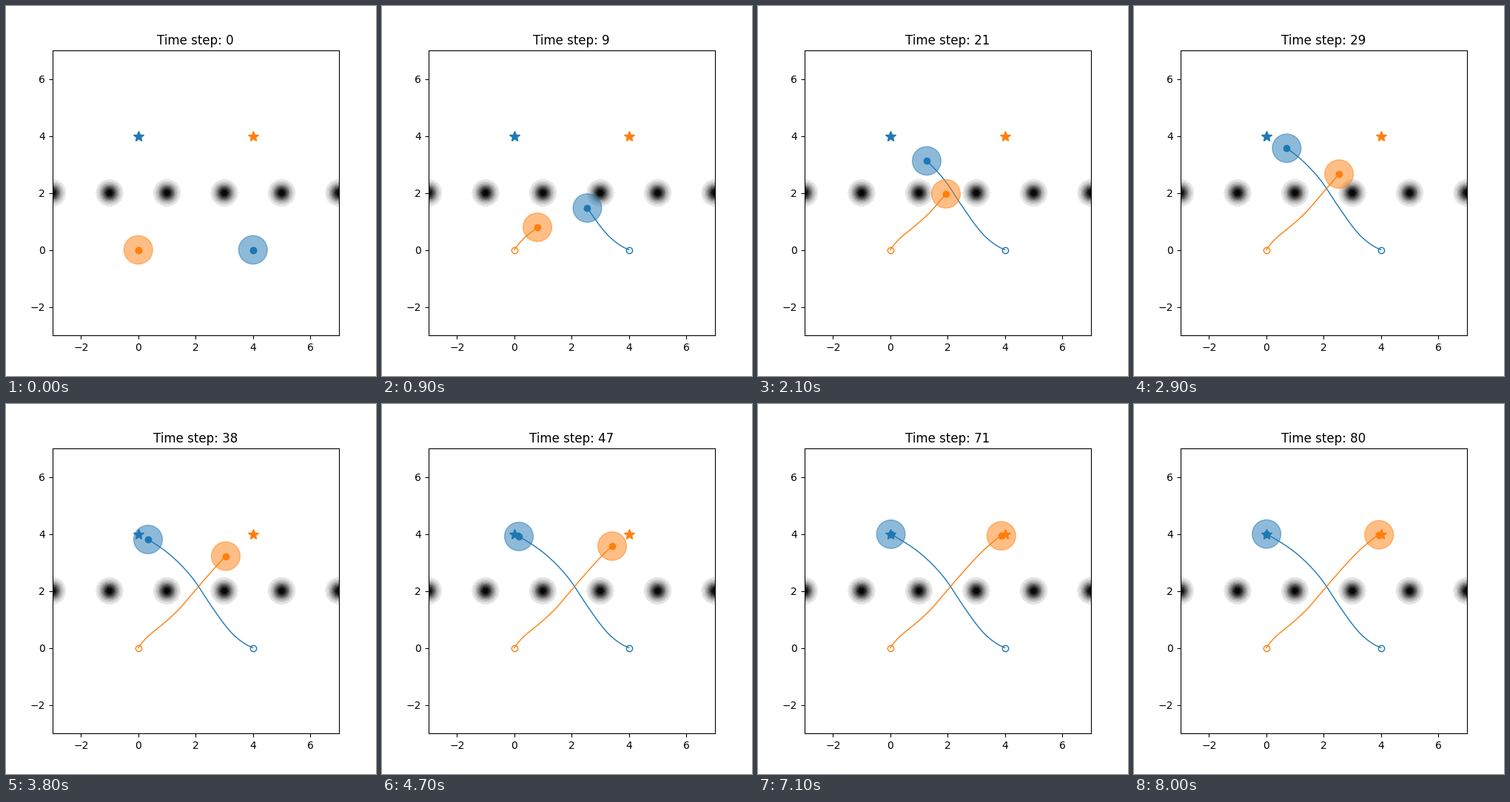
A matplotlib script for the animation above (8100 ms loop, 500 by 500 pixels).

```python
import numpy as np
import matplotlib.pyplot as plt
from matplotlib.animation import FuncAnimation
from matplotlib.patches import Circle

STEPS = 81
INTERVAL = 100
KEY_STEPS = np.array([0, 4, 9, 15, 21, 47, 80])

# Waypoints (x, y) at the key steps.
BLUE_PATH = [(4, 0), (3.284, .494), (2.548, 1.468), (1.845, 2.507),
             (1.27, 3.122), (.161, 3.909), (.01, 3.994)]
ORANGE_PATH = [(0, 0), (.32, .387), (.806, .792), (1.41, 1.345),
               (1.942, 1.966), (3.413, 3.571), (3.934, 3.969)]


def hermite(t, keys, values):
    """Smooth curve through the values, with slopes taken from their neighbours."""
    slopes = np.gradient(values, keys, axis=0, edge_order=2)
    i = np.clip(np.searchsorted(keys, t, side="right") - 1, 0, len(keys) - 2)
    h = (keys[i + 1] - keys[i])[:, None]
    u = (t - keys[i])[:, None] / h
    ease = u * u * (3 - 2 * u)
    return ((1 - ease) * values[i] + ease * values[i + 1]
            + h * u * (1 - u) * ((1 - u) * slopes[i] - u * slopes[i + 1]))


def approach(path, goal):
    """Positions at every step; the distance to the goal decays exponentially."""
    path, goal = np.array(path, float), np.array(goal, float)
    side = np.sign(goal - path[0] + (goal == path[0]))
    log_left = np.log((goal - path) * side)
    return goal - side * np.exp(hermite(np.arange(STEPS), KEY_STEPS, log_left))


def draw_obstacles(ax):
    x, y = np.meshgrid(np.linspace(-3, 7, 401), np.linspace(1, 3, 81))
    field = sum(np.exp(-((x - cx) ** 2 + (y - 2) ** 2) / (2 * 0.2**2))
                for cx in range(-3, 8, 2))
    ax.contourf(x, y, np.minimum(field, 1), levels=np.arange(1, 16) / 15,
                cmap="gray_r", vmin=0, vmax=1)


class Agent:
    def __init__(self, ax, color, path, goal):
        self.track = approach(path, goal)
        start = self.track[0]
        ax.plot(*goal, "*", color=color, ms=10)
        ax.plot(*start, "o", color=color, mfc="none", ms=6)
        self.trail, = ax.plot([], [], color=color, lw=1)
        self.body = ax.add_patch(Circle(start, 0.5, color=color,
                                        alpha=0.5, zorder=2.5))
        self.dot, = ax.plot([], [], "o", color=color, ms=6, zorder=3)

    def move(self, step):
        self.trail.set_data(*self.track[:step + 1].T)
        self.body.center = self.track[step]
        self.dot.set_data(*self.track[step:step + 1].T)


fig, ax = plt.subplots(figsize=(5, 5), dpi=100)
draw_obstacles(ax)
ax.set(xlim=(-3, 7), ylim=(-3, 7))
title = ax.set_title("")
agents = [Agent(ax, "C0", BLUE_PATH, (0, 4)),
          Agent(ax, "C1", ORANGE_PATH, (4, 4))]


def update(step):
    title.set_text(f"Time step: {step}")
    for agent in agents:
        agent.move(step)


anim = FuncAnimation(fig, update, frames=STEPS, interval=INTERVAL,
                     repeat=True, repeat_delay=0, blit=False)
plt.show()
```
